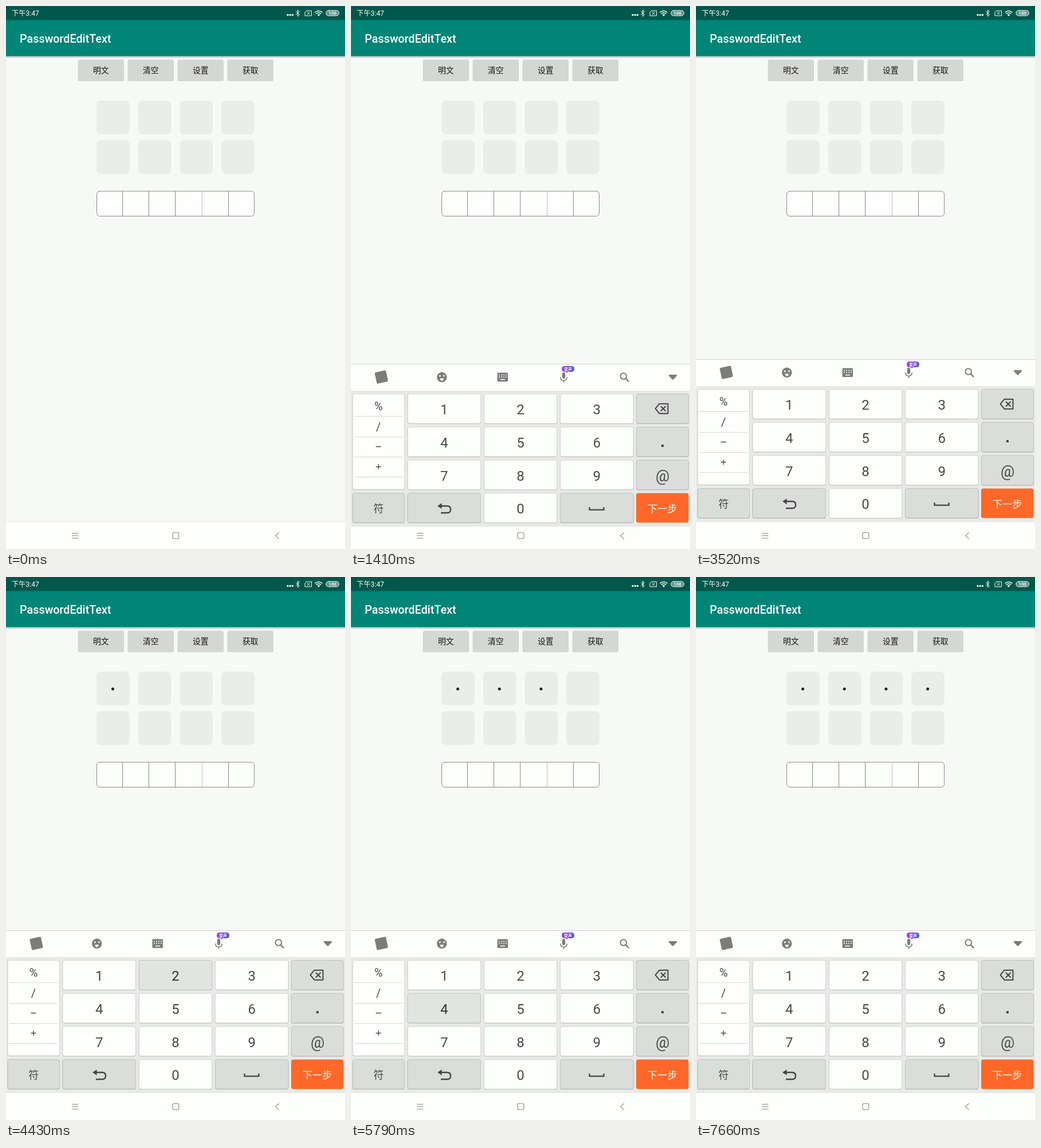
An HTML page that plays this animation: 592x947 px, repeating every 8000 ms.

```html
<!DOCTYPE html>
<html lang="zh">
<head>
<meta charset="utf-8">
<style>
html, body { margin: 0; width: 100%; height: 100%; overflow: hidden; background: #f7f9f7; }
svg { display: block; width: 100vw; height: 100vh; }
text { font-family: Roboto, 'Noto Sans CJK SC', 'Noto Sans CJK', sans-serif; }
.mid text, text.mid { text-anchor: middle; }
.line { fill: none; stroke-linecap: round; stroke-linejoin: round; }
.key { fill: #484a48; }
.key .face { fill: #fdfffd; stroke: #d2d4d2; }
.key .under { fill: #c3c5c3; }
.gray .face { fill: #dbdddb; stroke: #bfc1bf; }
.gray .under { fill: #b5b7b5; }
.go { fill: #fff; }
.go .face { fill: #ff6829; stroke: none; }
.go .under { fill: none; }
.down { fill: #303230; }
.down .face { fill: #e2e4e2; stroke: #c6c8c6; }
.gray.down .face { fill: #c8cac8; }
</style>
</head>
<body>
<svg viewBox="0 0 592 947" preserveAspectRatio="none">
  <defs>
    <linearGradient id="shade" x2="0" y2="1">
      <stop stop-color="#b4bab7"/><stop offset="1" stop-color="#f7f9f7"/>
    </linearGradient>
    <linearGradient id="violet">
      <stop stop-color="#a53be2"/><stop offset="1" stop-color="#4a5ef6"/>
    </linearGradient>
  </defs>
  <rect width="592" height="947" fill="#f7f9f7"/>
  <rect y="87.500" width="592" height="4" fill="url(#shade)"/>
  <rect y="24" width="592" height="63.500" fill="#008577"/>
  <rect width="592" height="24.500" fill="#00574b"/>

  <g fill="#fff">
    <text x="10" y="17.300" font-size="12.200">下午3:47</text>
    <text x="24" y="64" font-size="19.750" font-weight="500">PasswordEditText</text>
    <circle cx="492" cy="15.600" r="1.700"/><circle cx="496.200" cy="15.600" r="1.700"/><circle cx="500.400" cy="15.600" r="1.700"/>
    <g class="line" stroke="#fff">
      <path d="M506.500 9.800l6 5.400-3 2.800V7l3 2.800-6 5.400"/>
      <path d="M525 8.300h8.500v8.700h-11.500v-5.700zM526 10.500l4.300 4.300M530.300 10.500l-4.300 4.300"/>
      <path d="M540 10.800q6-4.800 12 0M542.200 13.300q3.800-3 7.600 0" stroke-width="1.500"/>
      <rect x="558.800" y="7.800" width="22.700" height="9.200" rx="4.600" fill="#5d918a"/>
    </g>
    <path d="M543.600 15q2.400-1.600 4.800 0l-2.400 2.900z"/>
    <path id="data" d="M549 15h5l-2.500 4z"/>
    <text class="mid" x="570.200" y="15.300" font-size="8" font-weight="700">100</text>
  </g>

  <g id="buttons" class="mid" font-size="13.800"></g>
  <g id="tiles"></g>
  <g class="line" stroke="#888">
    <rect x="158.500" y="323" width="275" height="43.500" rx="5" fill="#fdfffd"/>
    <path d="M203.500 323v43.500M249.500 323v43.500M295.500 323v43.500M388.500 323v43.500"/>
    <path d="M342.500 323.500v42.500" stroke="#bbb"/>
  </g>
  <path d="M0 899.500H592" stroke="#e6e8e6"/>
  <rect y="900" width="592" height="47" fill="#fdfffd"/>

  <g id="board">
    <rect y="616" width="592" height="331" fill="#fdfffd"/>
    <path d="M0 616.500H592" stroke="#d2d4d2"/>
    <rect y="663" width="592" height="237" fill="#e8eae8"/>
    <g fill="#7b7d7b">
      <rect x="43" y="629" width="20" height="20" rx="2" transform="rotate(-12 53 639)"/>
      <circle cx="158.700" cy="639.300" r="8.700"/>
      <rect x="255.500" y="631.500" width="18.500" height="15.500" rx="1.500"/>
      <rect x="368.800" y="631" width="5.400" height="11" rx="2.700"/>
      <path d="M555.500 635h13q1.500 1 0 2.500l-5.500 5.800q-1 1-2 0l-5.500-5.800q-1.500-1.500 0-2.500z"/>
    </g>
    <g class="line" stroke="#7b7d7b" stroke-width="1.700">
      <path d="M365.800 640q.5 5.200 5.700 5.200t5.700-5.200M371.500 645.500v2.700"/>
      <circle cx="475.800" cy="637.500" r="5.300" stroke-width="2"/>
      <path d="M480 641.800l4.500 4.700" stroke-width="2.400"/>
    </g>
    <g fill="#fdfffd">
      <circle cx="155.300" cy="637" r="1.500"/>
      <path d="M155.500 641.200h6.400q-.5 4.300-3.200 4.300t-3.200-4.300z"/>
      <path class="line" d="M163.500 635.500l-2.500 1.500 2.500 1.200" stroke="#fdfffd" stroke-width="1.200"/>
      <path d="M258 635.500h14M258 639h14" stroke="#fdfffd" stroke-width="1.700" stroke-dasharray="2 2"/>
      <path d="M260.500 643.500h8.500" stroke="#fdfffd" stroke-width="1.500"/>
    </g>
    <path d="M373 620h12q5 0 5 5t-5 5h-6l-3 2.500v-2.500h-3q-5 0-5-5t5-5z" fill="url(#violet)"/>
    <text class="mid" x="379" y="627.700" font-size="7" font-weight="700" fill="#fff">变声</text>
    <g id="keys" class="mid"></g>
    <path d="M6 707.500H90M6 743.500H90M6 778.500H90M6 813.500H90" stroke="#d5d7d5"/>
    <g class="mid" fill="#484a48" font-size="20">
      <text x="48" y="697">%</text><text x="48" y="732.500">/</text>
    </g>
    <path d="M43.500 760.500h9M43.500 795.500h9M48 791v9" stroke="#484a48" stroke-width="1.400"/>
    <g class="line" stroke="#444" stroke-width="2.300">
      <path d="M538.500 685.700h15v17h-15l-7-8.500zM541.500 690.500l7.500 7.500M549 690.500l-7.500 7.500" stroke-width="2"/>
      <path d="M157 864h11q6 0 6 6t-6 6h-11" stroke-linecap="butt"/>
      <path d="M416.500 866v4.700h25v-4.700" stroke-linecap="butt" stroke-linejoin="miter"/>
    </g>
    <path d="M151 864l7.500-5v10z" fill="#444"/>
    <rect x="542" y="757" width="4" height="4" fill="#444"/>
  </g>

  <g class="line" stroke="#858785" stroke-width="1.100">
    <path d="M115.500 919.500h10.500M115.500 923.700h10.500M115.500 928h10.500"/>
    <rect x="291" y="918.200" width="10.800" height="10.800" rx="2.500"/>
    <path d="M476.500 918.300l-6 5.400 6 5.400"/>
  </g>
</svg>
<script>
const $ = id => document.getElementById(id);
const add = (id, html) => $(id).insertAdjacentHTML('beforeend', html);

['明文', '清空', '设置', '获取'].forEach((label, i) => {
  const x = 126 + i * 87;
  add('buttons', `<rect x="${x - .5}" y="95" width="80.5" height="36" rx="2" fill="#c3c5c3" opacity=".7"/>
    <rect x="${x}" y="93.5" width="79.5" height="36" rx="2" fill="#d5d7d4"/>
    <text x="${x + 39.7}" y="117" fill="#151515">${label}</text>`);
});

const dots = [];
for (let i = 0; i < 8; i++) {
  const x = 158 + i % 4 * 72.7, y = i < 4 ? 165 : 234;
  add('tiles', `<rect x="${x}" y="${y}" width="57.7" height="59" rx="7.5" fill="#ebedea"/>
    <circle cx="${x + 28.5}" cy="${y + 30.2}" r="2.5" fill="#222"/>`);
  dots.push($('tiles').lastElementChild);
}

function key(x, y, w, h, label = '', kind = '', size = 24) {
  add('keys', `<g class="key ${kind}">
    <rect class="under" x="${x}" y="${y + 1}" width="${w}" height="${h - .5}" rx="4"/>
    <rect class="face" x="${x + .5}" y="${y + .5}" width="${w - 1}" height="${h - 1}" rx="3.5"/>
    <text x="${x + w / 2}" y="${y + 27.3 + size * .38}" font-size="${size}">${label}</text></g>`);
  return $('keys').lastElementChild;
}
const rows = [668, 725.7, 783.4, 841], cols = [98.5, 231.8, 365], H = 52.5;
key(2.5, 668, 91.5, 167.5);
const keys = {};
for (let n = 1; n <= 9; n++) keys[n] = key(cols[(n - 1) % 3], rows[Math.floor((n - 1) / 3)], 128.5, H, n);
keys.del = key(498, rows[0], 92, H, '', 'gray');
key(498, rows[1], 92, H, '', 'gray');
key(498, rows[2], 92, H, '@', 'gray', 27);
key(2.5, rows[3], 91.5, H, '符', 'gray', 18);
key(cols[0], rows[3], 128.5, H, '', 'gray');
key(cols[1], rows[3], 128.5, H, 0);
key(cols[2], rows[3], 128.5, H, '', 'gray');
key(497.5, rows[3], 92.5, H, '下一步', 'go', 17.3);

// key, pressed, released, time the dots change, change in dots
const taps = [
  [1, 4140, 4180, 4220, 1],
  [2, 4430, 4550, 4550, 1],
  [3, 5050, 5170, 5210, 1],
  [4, 5790, 5880, 5920, 1],
  [5, 6080, 6210, 6210, 1],
  ['del', 7530, 7660, 7620, -1],
];
// The screen refreshes only at these moments while the keyboard rises.
const ticks = [1280, 1320, 1370, 1410, 1450, 1500, 1610];
const between = (t, a, b) => t >= a && t < b;

function draw(t) {
  const tick = ticks.filter(v => v <= t).pop() || 0;
  const p = Math.min(1, Math.max(0, (tick - 1271.3) / 267));
  $('board').setAttribute('transform', `translate(0 ${Math.round(331 * (1 - p) ** 5)})`);
  let count = 0;
  for (const [name, press, release, change, step] of taps) {
    keys[name].classList.toggle('down', between(t, press, release));
    if (t >= change) count += step;
  }
  dots.forEach((d, i) => d.style.display = i < count ? '' : 'none');
  $('data').style.display = between(t, 2520, 3520) || between(t, 6540, 7530) ? '' : 'none';
}

const start = performance.now();
function frame() {
  draw((performance.now() - start) % 8000);
  requestAnimationFrame(frame);
}
frame();
</script>
</body>
</html>
```
